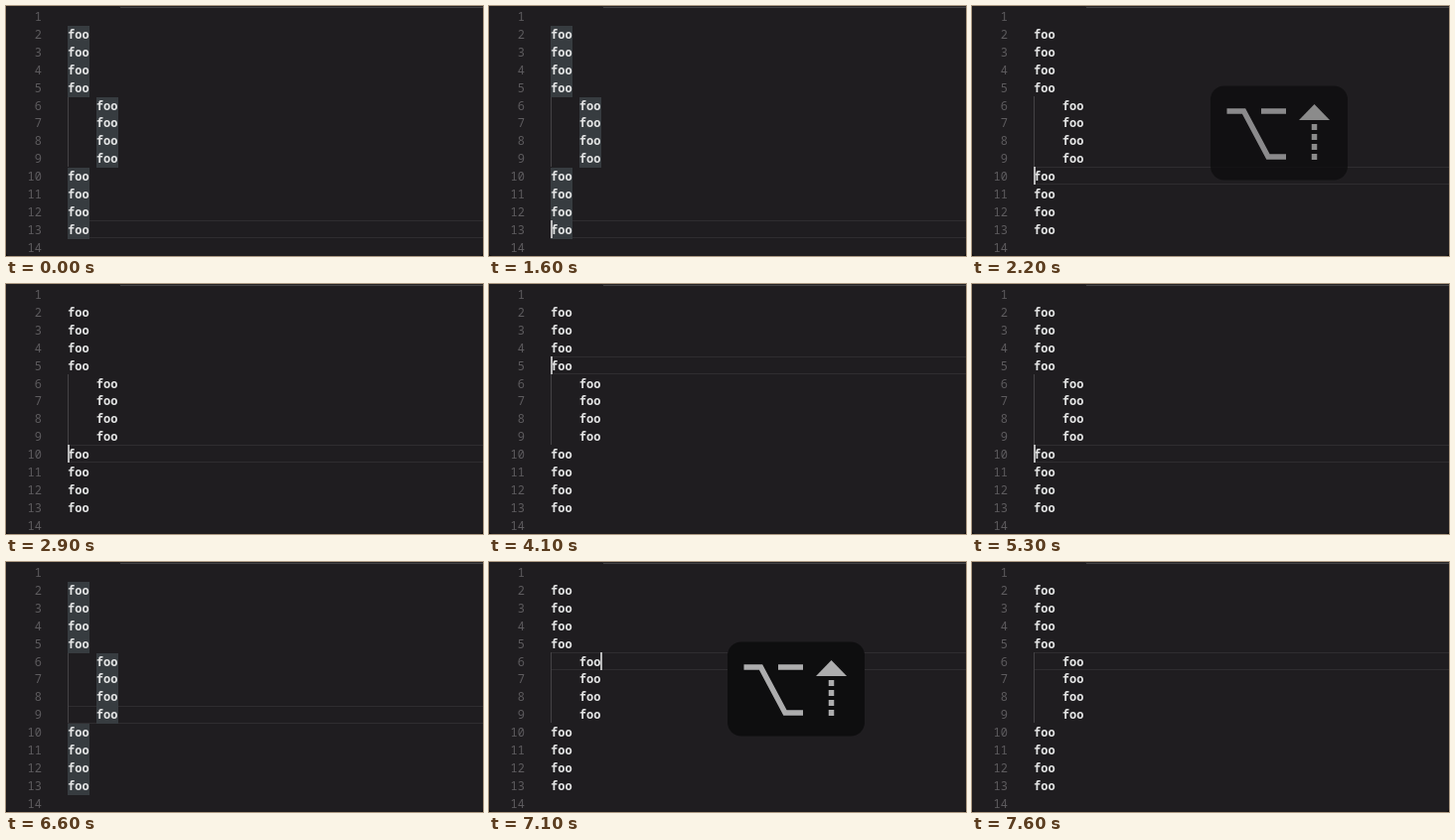
Recreate the animation shown at these times as an HTML page with a canvas. Size 480x252 px, loop 8000 ms.

```html
<!DOCTYPE html>
<html lang="en">
<head>
<meta charset="utf-8">
<title>Cursor jumps by indentation</title>
<style>
  html, body { margin: 0; width: 100%; height: 100%; overflow: hidden; background: #1f1d20; }
  canvas { display: block; }
</style>
</head>
<body>
<canvas id="stage" width="480" height="252"></canvas>
<script>
const ctx = document.getElementById('stage').getContext('2d');
const LOOP = 8000, STEP = 100;
const LEFT = 62, CHAR = 7.2, ROW = 17.9;
const FONT = '"Noto Sans Mono", "DejaVu Sans Mono", monospace';

// Where the cursor stands from each time on, and whether matches are marked
const moves = [
  { at: 0, row: 13, col: 0, marked: true },
  { at: 1900, row: 10, col: 0 },
  { at: 3100, row: 5, col: 0 },
  { at: 4300, row: 10, col: 0 },
  { at: 5700, row: 9, col: 7, marked: true },
  { at: 7000, row: 6, col: 7 }
];
const blinks = [[600, 1100], [1600, 2400], [2900, 3600], [4100, 4800],
                [5300, 5700], [6200, 6600], [7000, 7500]];
const keys = [
  { from: 1900, to: 2400, fade: 255, up: true },
  { from: 3100, to: 3700, fade: 330, up: true },
  { from: 4300, to: 4900, fade: 255, up: false },
  { from: 7000, to: 7600, fade: 330, up: true }
];

const rowTop = row => 2 + (row - 1) * ROW;
const colX = col => LEFT + col * CHAR;
const indent = row => (row >= 6 && row <= 9 ? 4 : 0);

function rect(x, y, w, h, color) {
  ctx.fillStyle = color;
  ctx.fillRect(x, y, w, h);
}

function card(x, y, w, h, radii, color) {
  ctx.fillStyle = color;
  ctx.beginPath();
  ctx.roundRect(x, y, w, h, radii);
  ctx.fill();
}

function text(str, x, y, weight, color, align) {
  ctx.font = `${weight} 12px ${FONT}`;
  ctx.textAlign = align;
  ctx.fillStyle = color;
  ctx.fillText(str, x, y);
}

function line(points) {
  ctx.beginPath();
  points.forEach(([x, y]) => ctx.lineTo(x, y));
  ctx.stroke();
}

function drawEditor({ row, col, marked }, cursorOn) {
  rect(0, 0, 480, 252, '#0c0b0d');
  card(0, 0, 480, 252, [0, 0, 4, 4], '#1f1d20');
  rect(114, 0, 366, 1, '#262527');
  rect(115, 1, 365, 1, '#434244');

  const top = Math.round(rowTop(row) - 0.7);
  rect(LEFT, top, 418, 1, '#2f2d30');
  rect(LEFT, top + 17, 418, 1, '#2f2d30');
  rect(LEFT, 91, 1, 71, '#444245');

  for (let r = 1; r <= 14; r++) {
    const y = rowTop(r), base = Math.round(y + 13);
    text(r, 36, base, 400, '#5d5b5e', 'right');
    if (r === 1 || r === 14) continue;
    const x = colX(indent(r));
    if (marked) {
      const y0 = Math.round(y);
      rect(Math.round(x), y0, 22, Math.round(y + ROW) - y0, '#373c40');
    }
    text('foo', x, base, 600, '#e4e5e5', 'left');
  }
  if (cursorOn) rect(Math.round(colX(col)), top, 2, 18, '#bababb');
}

function drawKeys(up, alpha) {
  ctx.save();
  ctx.globalAlpha = alpha;
  card(240, 80.5, 138, 95, 14, '#0e0e0f');

  ctx.strokeStyle = ctx.fillStyle = '#adadae';
  ctx.lineWidth = 5.5;
  line([[256.5, 106], [273.5, 106], [298, 152], [316, 152]]);
  line([[291, 106], [316, 106]]);

  if (up) {
    ctx.translate(0, 254);
    ctx.scale(1, -1);
  }
  ctx.setLineDash([6, 4]);
  line([[344.5, 99], [344.5, 135]]);
  ctx.beginPath();
  ctx.moveTo(329, 139);
  ctx.lineTo(360, 139);
  ctx.lineTo(344.5, 155);
  ctx.fill();
  ctx.restore();
}

function frame(now) {
  const t = Math.floor((now % LOOP) / STEP) * STEP;
  const pose = moves.filter(m => m.at <= t).pop();
  drawEditor(pose, blinks.some(([a, b]) => t >= a && t < b));
  const key = keys.find(k => t >= k.from && t < k.to);
  if (key) drawKeys(key.up, Math.min(1, (key.to - t) / key.fade));
}

const start = performance.now();
function tick() {
  frame(performance.now() - start);
  requestAnimationFrame(tick);
}
tick();
</script>
</body>
</html>
```
